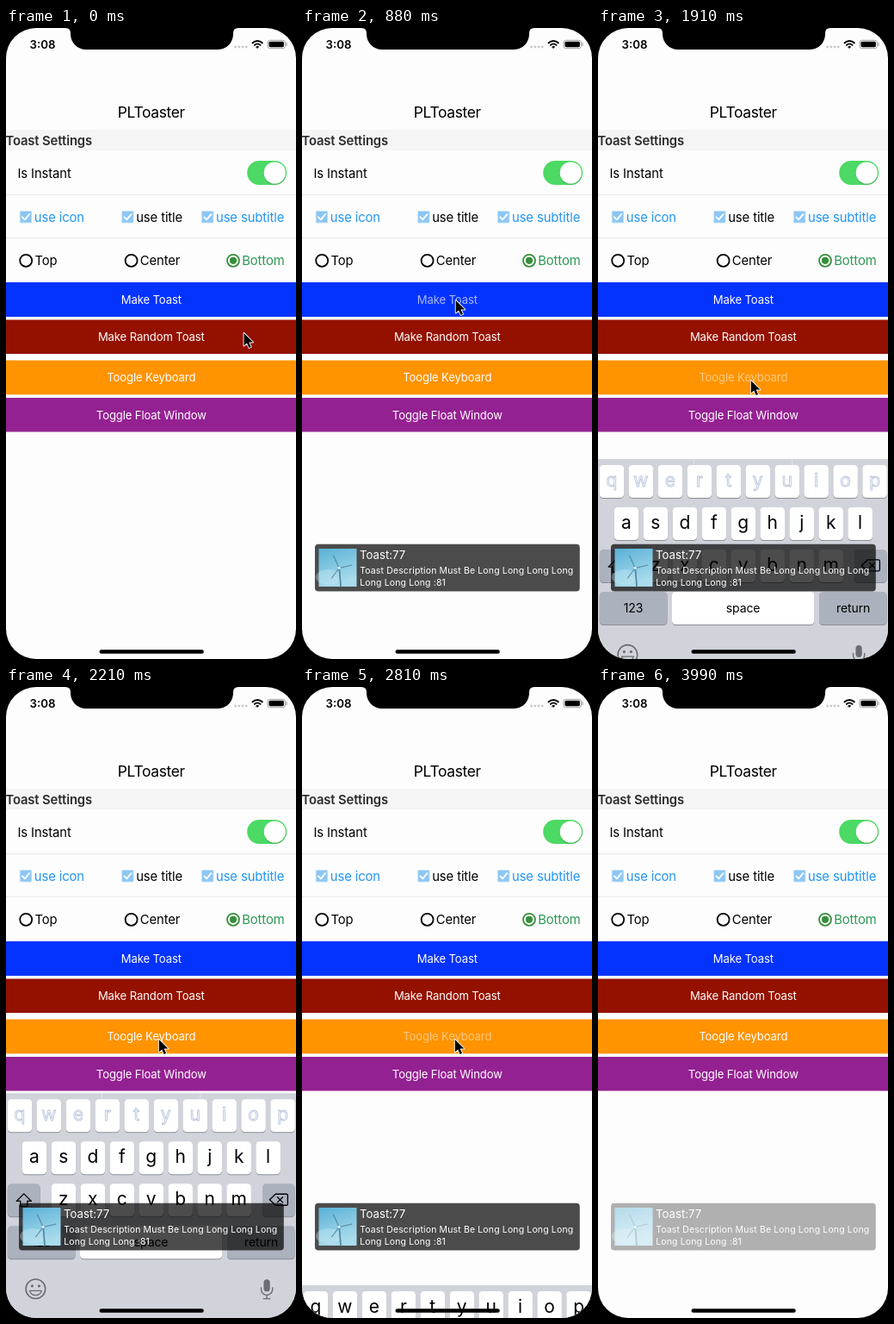
Write an HTML page that moves like this. It is 337 by 732 pixels and loops after 4090 ms.

```html
<!DOCTYPE html>
<html lang="en">
<head>
<meta charset="utf-8">
<title>Toast settings</title>
<style>
  html, body { margin: 0; width: 100%; height: 100%; overflow: hidden; background: #000; }
  svg { display: block; width: 100vw; height: 100vh; }
  text { font-family: Inter, Roboto, "Liberation Sans", sans-serif; white-space: pre; }
  .title { font-size: 17.4px; letter-spacing: -.32px; }
  .body { font-size: 14.85px; letter-spacing: -.12px; }
  .bold { font-weight: 600; letter-spacing: -.16px; }
  .button { font-size: 13.1px; letter-spacing: -.12px; fill: #fff; }
  .clock { font-size: 13.3px; font-weight: 600; }
  .head { font-size: 13.2px; fill: #fff; }
  .note { font-size: 10.5px; letter-spacing: .14px; fill: #fff; }
  .key { font-size: 21px; }
  .word { font-size: 14px; letter-spacing: -.1px; }
  .ghost .key { fill: #f4f7fc; stroke: #b3bfd8; stroke-width: .8px; }
  .mid { text-anchor: middle; }
</style>
</head>
<body>
<svg id="stage" viewBox="0 0 337 732" preserveAspectRatio="none"></svg>
<script>
const LOOP = 4090;
// The picture is refreshed only at these moments.
const TICKS = [0, 150, 290, 440, 590, 730, 880, 1020, 1170, 1320, 1460, 1610, 1760,
  1910, 2060, 2210, 2360, 2510, 2660, 2810, 2950, 3100, 3990];
const POINTER = [[0, 276.5, 354], [150, 219, 325], [290, 195, 319], [440, 178.7, 316],
  [880, 178.7, 316], [1020, 178.3, 357], [1170, 178.3, 407], [1320, 178.3, 409], [1460, 177.8, 409]];
const KEYBOARD_TOP = 470, KEYBOARD_HEIGHT = 262;

const rect = (x, y, w, h, fill, r = 0) =>
  `<rect x="${x}" y="${y}" width="${w}" height="${h}" rx="${r}" fill="${fill}"/>`;
const text = (x, y, cls, label, fill) =>
  `<text x="${x}" y="${y}" class="${cls}"${fill ? ` fill="${fill}"` : ''}>${label}</text>`;
const path = (d, stroke, w, fill = 'none') =>
  `<path d="${d}" fill="${fill}" stroke="${stroke}" stroke-width="${w}" stroke-linecap="round" stroke-linejoin="round"/>`;
const circle = (x, y, r, fill, stroke = 'none', w = 0) =>
  `<circle cx="${x}" cy="${y}" r="${r}" fill="${fill}" stroke="${stroke}" stroke-width="${w}"/>`;
const group = (id, content) => `<g id="${id}">${content}</g>`;

function statusBar() {
  const dots = [266.7, 270.9, 275.1, 279.3].map(x => circle(x, 22, 1.4, '#c9c9c9')).join('');
  const wifi = path('M286.6 17.2a8 8 0 0 1 11.2 0M288.9 19.7a4.8 4.8 0 0 1 6.6 0', '#000', 2)
    + path('M290.6 21.8a2.4 2.4 0 0 1 3.2 0l-1.6 1.6z', '#000', .6, '#000');
  const battery = `<rect x="304" y="14.3" width="20.4" height="9.4" rx="2.6" fill="none" stroke="#999" stroke-width=".9"/>`
    + rect(305.5, 15.8, 17.4, 6.4, '#000', 1.4) + path('M326 17.6v2.8', '#999', 1.1);
  const notch = '<path d="M69 0q6 0 6 6v1c0 10 8 18 18 18h153c10 0 18-8 18-18v-1q0-6 6-6z"/>';
  return text(27.5, 23.5, 'clock', '3:08') + dots + wifi + battery + notch;
}

function checkbox(x, label, color) {
  return rect(x, 212, 14.4, 14.4, '#c9e4fa', 1) + rect(x + .9, 212.9, 12.6, 12.6, '#8cc6f3')
    + path(`M${x + 3.2} 219.4l2.9 3 5.2-6.2`, '#fff', 1.9)
    + text(x + 17, 224.6, 'body', label, color);
}

function radio(x, label, color, on) {
  return circle(x, 269.8, 7, 'none', color, 1.8) + (on ? circle(x, 269.8, 4.1, color) : '')
    + text(x + 10.2, 275.4, 'body', label, on ? '#2a9853' : color);
}

const button = (y, h, fill, baseline, label, id) =>
  rect(0, y, 337, h, fill) + group(id, text(168.8, baseline, 'button mid', label));

function settings() {
  const lines = [193.5, 243.5].map(y => rect(0, y - .4, 337, .8, '#e6e6e7')).join('');
  const toggle = rect(280.2, 154, 46, 28, '#4cd964', 14)
    + circle(312.3, 169.4, 12.8, '#000" opacity=".13') + circle(312.3, 168, 12.6, '#fff');
  return text(168.8, 104.2, 'title mid', 'PLToaster')
    + rect(0, 118, 337, 24, '#f5f5f5') + text(-.5, 136.3, 'body bold', 'Toast Settings', '#2b2b2e')
    + text(13.4, 173.9, 'body', 'Is Instant') + toggle + lines
    + checkbox(15.8, 'use icon', '#2196f3')
    + checkbox(134.2, 'use title', '#000')
    + checkbox(227, 'use subtitle', '#2196f3')
    + radio(23.2, 'Top', '#000') + radio(145.6, 'Center', '#000') + radio(264, 'Bottom', '#388e3c', true)
    + button(295, 40, '#0433ff', 319.7, 'Make Toast', 'makeLabel')
    + button(338.5, 39.5, '#941100', 363.1, 'Make Random Toast', 'randomLabel')
    + button(385.5, 39.8, '#ff9300', 410.2, 'Toogle Keyboard', 'keyboardLabel')
    + button(429, 39.5, '#942192', 453.7, 'Toggle Float Window', 'floatLabel');
}

function key(x, y, w, fill) {
  return rect(x, y + 1, w, 38, '#8b8e94', 4.4) + rect(x, y, w, 38, fill, 4.4);
}

function keyRow(letters, x, y) {
  return [...letters].map((c, i) => {
    const left = x + i * 33.96;
    return key(left, y, 28.5, '#fff') + text(left + 14.25, y + 25, 'key mid', c);
  }).join('');
}

function keyboard() {
  const grey = '#abb1bd', ink = '#6a6d74';
  const shift = path('M20.8 586.6l-8.6 8.6h4.6v6.2h8v-6.2h4.6z', '#000', 1.3);
  const erase = path('M313.2 587h12.6q1.6 0 1.6 1.6v9.8q0 1.6-1.6 1.6h-12.6l-6.8-6.5zM315.4 590.4l6.2 6.2M321.6 590.4l-6.2 6.2', '#000', 1.3);
  const smile = circle(34.4, 697, 11.3, 'none', ink, 1.6)
    + circle(30.4, 693.6, 1.6, ink) + circle(38.4, 693.6, 1.6, ink)
    + path('M27.6 699.2h13.6a6.9 6.2 0 0 1-13.6 0z', ink, 1.3);
  const mic = rect(299.5, 686, 7.2, 14, ink, 3.6)
    + path('M296.5 695.6v2a6.6 6.6 0 0 0 13.2 0v-2M303.1 704.4v4M299.3 708.4h7.6', ink, 1.4);
  const bars = [111.5, 225.5].map(x => rect(x - .4, 470, .8, 7, '#e4e7ec')).join('');
  return rect(0, KEYBOARD_TOP, 337, KEYBOARD_HEIGHT + 2, '#d0d3da') + group('bars', bars)
    + group('topRow', keyRow('qwertyuiop', 1.7, 477))
    + keyRow('asdfghjkl', 18.7, 526) + keyRow('zxcvbnm', 52.6, 575)
    + key(1.8, 575, 38, grey) + shift + key(298, 575, 37.6, grey) + erase
    + key(1.8, 624, 78.8, grey) + text(41, 647.6, 'word mid', '123')
    + key(86, 624, 165.2, '#fff') + text(168.6, 647.6, 'word mid', 'space')
    + key(257, 624, 78.6, grey) + text(296.6, 647.6, 'word mid', 'return')
    + smile + mic;
}

function toast() {
  const photo = rect(19.5, 604, 44, 44, 'url(#sky)')
    + '<ellipse cx="31" cy="637" rx="15" ry="9" fill="#cdeaf4" opacity=".35"/>'
    + path('M43.4 627.5L45 647.5', '#5489a3', 1.8)
    + path('M43.2 626.5L36.5 612M43.2 626.5L58 623M43.2 626.5L34.5 638', '#55869f', 1.1)
    + circle(43.2, 626.5, 1.4, '#e8f5fa');
  return rect(15, 598.7, 307.8, 54.8, 'rgba(0,0,0,.7)', 4) + photo
    + text(67, 616, 'head', 'Toast:77')
    + text(67.2, 633.4, 'note', 'Toast Description Must Be Long Long Long Long')
    + text(67.2, 646.6, 'note', 'Long Long Long :81');
}

const stage = document.getElementById('stage');
stage.innerHTML = `<defs>
  <clipPath id="screen"><rect width="337" height="732" rx="35"/></clipPath>
  <linearGradient id="sky" x1="0" y1="0" x2=".35" y2="1">
    <stop offset="0" stop-color="#58b0d6"/><stop offset=".55" stop-color="#86c9e3"/><stop offset="1" stop-color="#a9dbec"/>
  </linearGradient></defs>`
  + rect(0, 0, 337, 732, '#000')
  + `<g clip-path="url(#screen)">` + rect(0, 0, 337, 732, '#fdfdfd')
  + settings() + statusBar() + group('keyboard', keyboard()) + group('toast', toast())
  + rect(108.5, 721.2, 121.3, 4.6, '#000', 2.3) + '</g>'
  + group('pointer', '<path d="M0 0V14.6L3.4 11.5 5.9 17 8.3 15.9 5.8 10.6H10.6Z" stroke="#fff" stroke-width="1.8" stroke-linejoin="round" paint-order="stroke"/>');

const part = {};
for (const id of ['makeLabel', 'keyboardLabel', 'keyboard', 'bars', 'topRow', 'toast', 'pointer'])
  part[id] = document.getElementById(id);

const ramp = (t, a, b) => Math.min(1, Math.max(0, (t - a) / (b - a)));
const show = (el, alpha) => el.setAttribute('opacity', alpha);
const move = (el, x, y) => el.setAttribute('transform', `translate(${x} ${y})`);

// A pressed label drops to 20 % at once and fades back after release.
const pressed = (t, down, up, done) => t < down ? 1 : .2 + .8 * ramp(t, up, done);

function pointerAt(t) {
  const next = POINTER.findIndex(p => p[0] > t);
  if (next < 0) return POINTER[POINTER.length - 1].slice(1);
  const [t0, x0, y0] = POINTER[next - 1], [t1, x1, y1] = POINTER[next];
  const k = ramp(t, t0, t1);
  return [x0 + (x1 - x0) * k, y0 + (y1 - y0) * k];
}

function keyboardShift(t) {
  if (t < 1704 || t >= 3100) return KEYBOARD_HEIGHT + 4;
  if (t < 2360) return KEYBOARD_HEIGHT * Math.exp((1704 - t) / 95);
  if (t < 2700) return 0;
  return KEYBOARD_HEIGHT * (1 - Math.exp((2700 - t) / 57));
}

function draw(time) {
  const t = TICKS.filter(v => v <= time).pop();
  show(part.makeLabel, pressed(t, 590, 690, 1020));
  show(part.keyboardLabel, t < 2510 ? pressed(t, 1610, 1720, 2210) : pressed(t, 2510, 2730, 2950));
  show(part.toast, ramp(t, 640, 860) * (1 - .57 * ramp(t, 3900, 3990)));
  move(part.keyboard, 0, keyboardShift(t));
  part.topRow.setAttribute('class', t < 2660 ? 'ghost' : '');
  show(part.bars, t < 2660 ? 1 : 0);
  move(part.pointer, ...pointerAt(t));
  show(part.pointer, t < 3100 ? 1 : 0);
}

const start = performance.now();
function frame() {
  draw((performance.now() - start) % LOOP);
  requestAnimationFrame(frame);
}
frame();
</script>
</body>
</html>
```
